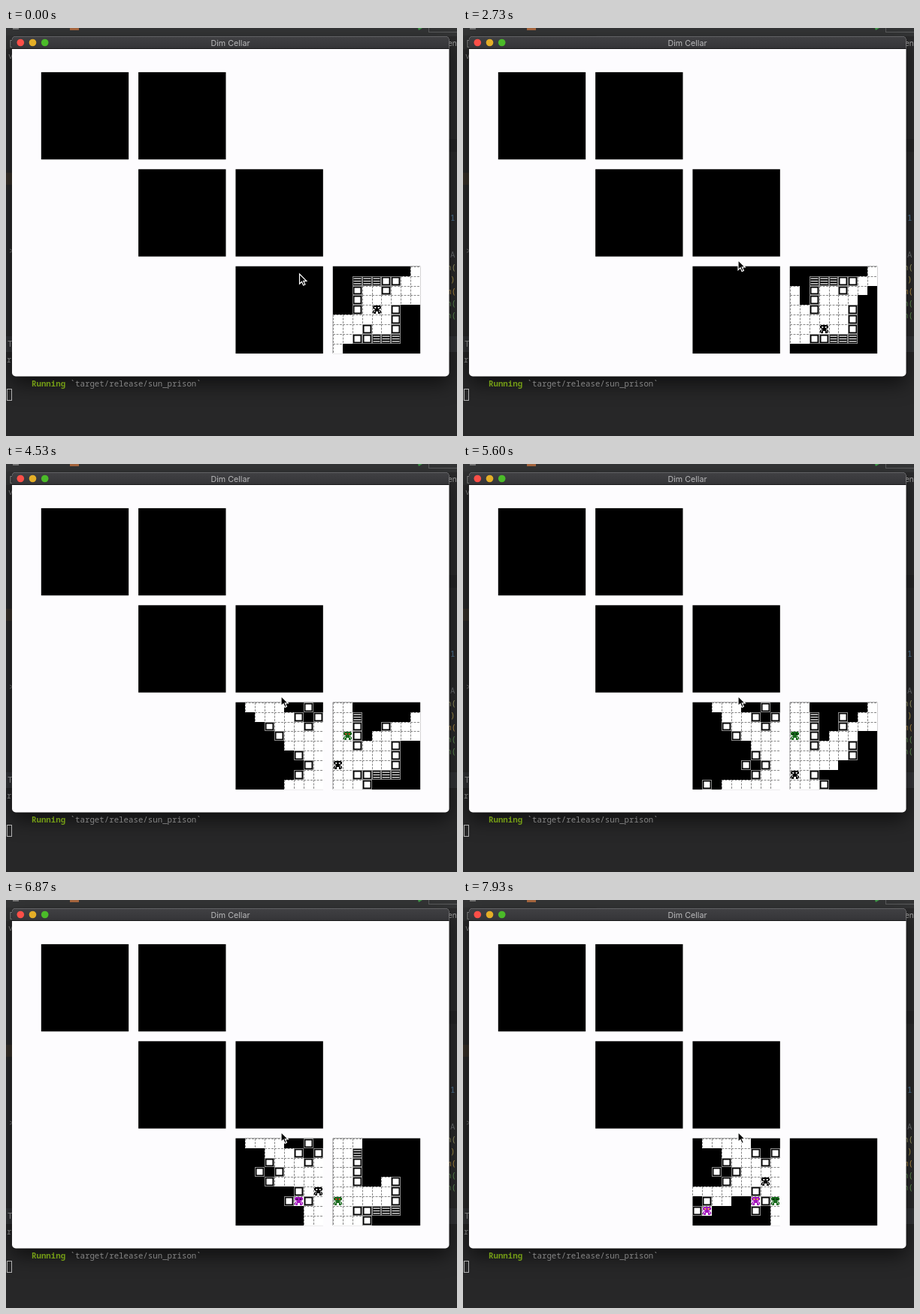
Write an HTML page with a canvas that moves like this. It is 600x544 px and loops after 8 s.

```html
<!DOCTYPE html>
<html lang="en">
<head>
<meta charset="utf-8">
<title>Dim Cellar</title>
<style>
html, body { margin: 0; width: 100%; height: 100%; overflow: hidden; background: #262627; }
canvas { display: block; width: 600px; height: 544px; }
</style>
</head>
<body>
<canvas id="stage" width="600" height="544"></canvas>
<script>
const ctx = document.getElementById('stage').getContext('2d');
const LOOP = 8000;
const CELL = 12.93;
const STEP = 129.33;
const MONO = '"Noto Sans Mono", "DejaVu Sans Mono", monospace';
const SANS = 'Inter, Roboto, sans-serif';

// Terrain: # unseen, . floor, O crate, = bars
const map = s => s.split('/');
const dark = map(Array(9).fill('#########').join('/'));
const roomA = map('########./##===OO../##O..O.../##O....../##O...O##/......O##/...O..O##/..OO===##/.########');
const roomB = map('#########/##===O#../##O..O.../##O....../##O...O##/#.....O##/...O..O##/..O#===##/..#######');
const roomC = map('########./##===OO../.#O..O..#/.#O....##/..O...O##/......O##/......O##/..OO===##/#########');
const roomCrate = roomC.map((r, i) => i === 6 ? '...O..O##' : r);
const roomD = map('..#######/..=#####./..O##O.../..O#...../..O...O##/......O##/......O##/..OO===##/...O#####');
const roomE = map('..######./..=##O#../..O##O.../..O#...##/..O...O##/......O##/.....####/..O######/...O#####');
const roomF = map('...######/..=######/..O######/..O######/..O##.O##/......O##/......O##/..OO===##/...O#####');
const hallD = map('#....##O#/##....O#O/###O...O./####O..../#####..../######O../#######O./######O../#####....');
const hallE = map('##...##O#/###...O#O/###O...O./####O..../######.../######O../#####O#O./######O../#O#......');
const hallF = map('#....##O#/###...O#O/###O...O./##O#O..../###O...../######O../#####O.O./#######../#######..');
const hallG = map('#.....###/###...O#O/###O...O./##O#O..../###O...../......O../#O..##.O./O.####O#./########.');

const HALL = 2, ROOM = 3;
const hero = (face, x, y) => ({ face, x, y, color: '#000', eye: '#fff' });
const green = (face, x, y, eye = '#04200a') => ({ face, x, y, color: '#17691c', eye });
const violet = (x, y, eye) => ({ face: HALL, x, y, color: '#a213bd', eye });
const RED = '#e8321c';
const guard = violet(6, 6, '#32043c');
const awake = '#ffc62e';

// start time, room, hall, actors
const turns = [
  [0, roomA, dark, hero(ROOM, 4, 4)],
  [100, roomB, dark, hero(ROOM, 3, 4)],
  [1665, roomCrate, dark, hero(ROOM, 3, 5)],
  [2270, roomC, dark, hero(ROOM, 3, 5)],
  [2590, roomC, dark, hero(ROOM, 3, 6)],
  [3000, roomC, dark, hero(ROOM, 2, 6)],
  [3470, roomD, dark, hero(ROOM, 1, 6)],
  [4525, roomD, hallD, hero(ROOM, 0, 6), green(ROOM, 1, 3, RED)],
  [4865, roomE, hallE, hero(ROOM, 0, 7), green(ROOM, 1, 3)],
  [4925, roomE, hallE, hero(ROOM, 0, 7), green(ROOM, 0, 3)],
  [5665, roomE, hallE, hero(HALL, 8, 7), green(ROOM, 0, 3)],
  [5725, roomE, hallE, hero(HALL, 8, 7), green(ROOM, 0, 4)],
  [6525, roomF, hallF, hero(HALL, 8, 6), green(ROOM, 0, 4), guard],
  [6595, roomF, hallF, hero(HALL, 8, 6), green(ROOM, 0, 5), guard],
  [6795, roomF, hallF, hero(HALL, 8, 5), green(ROOM, 0, 5), guard],
  [6860, roomF, hallF, hero(HALL, 8, 5), green(ROOM, 0, 6, RED), guard],
  [7265, roomF, hallF, hero(HALL, 8, 4), green(ROOM, 0, 6, RED), guard],
  [7325, roomF, hallF, hero(HALL, 8, 4), green(HALL, 8, 6), guard],
  [7595, dark, hallG, hero(HALL, 7, 4), green(HALL, 8, 6),
    violet(6, 6, awake), violet(1, 7, awake)]
];

function rect(x, y, w, h, color) {
  ctx.fillStyle = color;
  ctx.fillRect(x, y, w, h);
}

function text(str, x, y, color, font) {
  ctx.font = font;
  ctx.fillStyle = color;
  ctx.fillText(str, x, y);
}

function box(x, y, w, h, color) {
  ctx.strokeStyle = color;
  ctx.lineWidth = 1;
  ctx.strokeRect(x + .5, y + .5, w - 1, h - 1);
}

function dot(x, y, r, color) {
  ctx.fillStyle = color;
  ctx.beginPath();
  ctx.arc(x, y, r, 0, 7);
  ctx.fill();
}

function desktop() {
  rect(0, 0, 600, 544, '#2b2b2c');
  rect(0, 0, 600, 11, '#343536');
  rect(0, 10, 178, 18, '#303132');
  rect(589, 148, 11, 17, '#252526');
  rect(0, 193, 8, 16, '#3a332b');
  rect(0, 411, 600, 21, '#343538');
  rect(0, 432, 600, 112, '#272728');
  rect(85, 0, 12, 3, '#a9683f');
  rect(9, 0, 8, 2, '#777');
  ctx.fillStyle = '#3f9a48';
  ctx.beginPath();
  ctx.moveTo(548, 0);
  ctx.lineTo(554, 0);
  ctx.lineTo(549, 3);
  ctx.fill();
  box(562, -6, 50, 12, '#5c5d5e');
  const small = '10.7px ' + MONO;
  text('ent', 588, 24, '#a8a8a8', '10px ' + SANS);
  [['1', 253, '#5680a4'], ['A', 302, '#6d7073'], ['n(', 319, '#a9a56c'], [')', 335, '#b5a04d'],
   ['m(', 351, '#c39a4a'], ['n(', 367, '#669b59'], ['n(', 383, '#669b59']].forEach(([s, y, c]) =>
    text(s, s.length > 1 ? 586 : 591, y + 4, c, small));
  text('[', 3, 24, '#999', small);
  text('v', 3, 41, '#888', small);
  text('>', 4, 301, '#888', small);
  text('T', 2, 425, '#aaa', '10.7px ' + SANS);
  text('r', 1, 446, '#999', small);
}

function windowFrame() {
  ctx.save();
  ctx.shadowColor = 'rgba(0,0,0,.6)';
  ctx.shadowBlur = 26;
  ctx.shadowOffsetY = 10;
  ctx.fillStyle = '#fdfcfe';
  ctx.beginPath();
  ctx.roundRect(8, 11, 581.5, 453.5, 5);
  ctx.fill();
  ctx.restore();
  ctx.save();
  ctx.clip();
  const bar = ctx.createLinearGradient(0, 11, 0, 28);
  bar.addColorStop(0, '#414144');
  bar.addColorStop(1, '#343437');
  rect(8, 11, 582, 17, bar);
  rect(8, 11, 582, 1, '#626265');
  rect(8, 27, 582, 1, '#151516');
  ctx.restore();
  ['#fc4f48', '#e4ae27', '#4bbb29'].forEach((c, i) => dot(19.3 + i * 16.2, 19.5, 4.8, c));
  ctx.textAlign = 'center';
  text('Dim Cellar', 298.5, 23.6, '#b9b9bb', '10.7px ' + SANS);
  ctx.textAlign = 'left';
}

function terminal() {
  text('Running', 34, 478, '#739b16', 'bold 10.75px ' + MONO);
  text('`target/release/sun_prison`', 85.6, 478, '#858585', '10.75px ' + MONO);
  box(1, 481, 7, 16, '#b0b0b0');
}

const faceX = n => 46.8 + n * STEP;
const faceY = n => 58.9 + n * 129.4;

function tile(kind, x, y, w, h) {
  if (kind === '#') return;
  if (kind === '.') {
    rect(x, y, w, h, '#fff');
    ctx.strokeStyle = '#888';
    ctx.lineWidth = 1;
    ctx.setLineDash([3, 1.5]);
    ctx.beginPath();
    ctx.moveTo(x, y + .5);
    ctx.lineTo(x + w, y + .5);
    ctx.moveTo(x + .5, y);
    ctx.lineTo(x + .5, y + h);
    ctx.stroke();
    ctx.setLineDash([]);
    return;
  }
  rect(x, y, w, h, '#000');
  box(x, y, w, h, '#8a8a8a');
  if (kind === 'O') rect(x + 2.5, y + 2.5, w - 5, h - 5, '#fff');
  else for (let i = 0; i < 3; i++) rect(x + 1.5, y + 2.4 + i * 3.4, w - 3, 1.4, '#e4e4e4');
}

function board(rows, face) {
  const x0 = faceX(face), y0 = faceY(2);
  rows.forEach((row, r) => [...row].forEach((kind, c) => {
    const x = Math.round(x0 + c * CELL), y = Math.round(y0 + r * CELL);
    tile(kind, x, y, Math.round(x0 + (c + 1) * CELL) - x, Math.round(y0 + (r + 1) * CELL) - y);
  }));
}

function creature({ face, x, y, color, eye }) {
  ctx.save();
  ctx.translate(Math.round(faceX(face) + x * CELL), Math.round(faceY(2) + y * CELL));
  const both = (x, y, w, h, c) => {
    rect(x, y, w, h, c);
    rect(13 - x - w, y, w, h, c);
  };
  rect(2, 1, 9, 5, color);
  both(1, 2, 2, 3, color);
  rect(4, 6, 5, 3, color);
  both(2, 7, 3, 1, color);
  both(1, 8, 1.5, 3, color);
  both(3, 9, 2, 3, color);
  both(2, 11, 2, 1, color);
  both(3.3, 3, 2, 1.8, eye);
  ctx.restore();
}

function pointer(t) {
  const p = Math.min(1, Math.max(0, (t - 700) / 680));
  const e = p * p * (3 - 2 * p);
  ctx.save();
  ctx.translate(390.5 - 24.5 * e, 328 - 18.5 * e);
  ctx.beginPath();
  [[0, 0], [0, 13], [3, 10.2], [5.1, 15], [7.4, 14], [5.3, 9.3], [9.3, 9.3]].forEach(([x, y]) => ctx.lineTo(x, y));
  ctx.closePath();
  ctx.fillStyle = '#000';
  ctx.strokeStyle = '#fff';
  ctx.lineWidth = 1.2;
  ctx.fill();
  ctx.stroke();
  ctx.restore();
}

function draw(t) {
  desktop();
  windowFrame();
  terminal();
  [[0, 0], [1, 0], [1, 1], [2, 1], [2, 2], [3, 2]].forEach(([c, r]) =>
    rect(faceX(c), faceY(r), CELL * 9, CELL * 9, '#000'));
  const [, room, hall, ...actors] = turns.findLast(turn => turn[0] <= t);
  board(room, ROOM);
  board(hall, HALL);
  actors.forEach(creature);
  pointer(t);
}

const start = performance.now();
function tick() {
  draw((performance.now() - start) % LOOP);
  requestAnimationFrame(tick);
}
tick();
</script>
</body>
</html>
```
